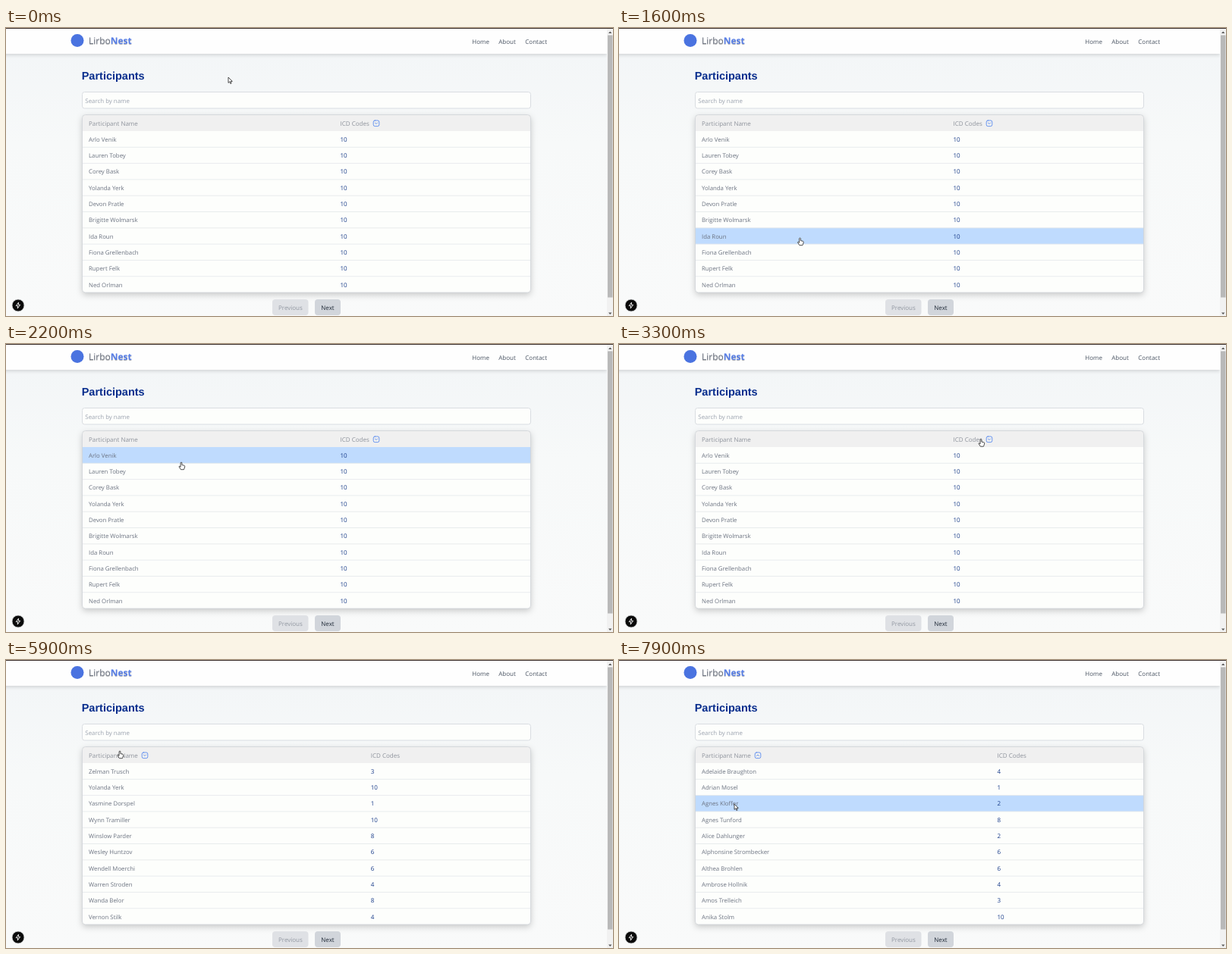
These frames come from a looping animation (800x380 px, 8 s). An HTML page:

```html
<!DOCTYPE html>
<html lang="en">
<head>
<meta charset="utf-8">
<title>Participants</title>
<style>
  html, body { margin: 0; width: 800px; height: 380px; overflow: hidden; background: #f7f9f9; }
  svg { display: block; }
  text { font: 500 8px "Open Sans", "Noto Sans", sans-serif; text-rendering: geometricPrecision; fill: #6b7280; }
  .bar { fill: #fefefe; filter: drop-shadow(0 2px 2px rgba(0, 0, 0, .13)); }
  .brand { font-size: 12px; font-weight: 400; filter: drop-shadow(.8px 1px .7px rgba(0, 0, 0, .28)); }
  .brand .strong { font-weight: 700; fill: #587fe8; }
  .nav text { fill: #4b5563; }
  .title { font: 700 14.5px "Liberation Sans", Arial, sans-serif; fill: #082d8d; }
  .hint { font-weight: 400; font-size: 7.9px; fill: #9ca3af; }
  .card { fill: #fdfefc; filter: drop-shadow(0 3px 4px rgba(0, 0, 0, .2)); }
  .head text { fill: #8d929b; }
  .name { font-size: 7.8px; font-weight: 400; }
  .code { font-size: 8px; fill: #173a88; }
  .hover { fill: #bfdbfe; }
  .line { stroke: #e4e7ea; stroke-width: .8; }
  .icon { fill: none; stroke: #5c8df0; stroke-width: .9; stroke-linecap: round; stroke-linejoin: round; }
  .cursor { fill: #fff; stroke: #222; stroke-width: .8; stroke-linejoin: round; }
</style>
</head>
<body>
<svg width="800" height="380" viewBox="0 0 800 380">
  <defs>
    <linearGradient id="sky" x2="0" y2="1">
      <stop stop-color="#f2f5f7"/><stop offset=".4" stop-color="#f7f9f9"/><stop offset="1" stop-color="#f9fafa"/>
    </linearGradient>
    <clipPath id="round"><rect x="100.5" y="114.5" width="591" height="234.5" rx="4"/></clipPath>
  </defs>

  <rect width="792" height="380" fill="url(#sky)"/>
  <rect class="bar" x="-6" width="798" height="34"/>
  <rect width="800" height="1" fill="#3b302c"/>

  <circle cx="94" cy="16.5" r="8.5" fill="#4a73e0"/>
  <text class="brand" x="109" y="21">Lirbo<tspan class="strong">Nest</tspan></text>
  <g class="nav">
    <text x="614.3" y="20.8">Home</text>
    <text x="649.3" y="20.8">About</text>
    <text x="684.3" y="20.8">Contact</text>
  </g>

  <text class="title" x="99.7" y="68.4">Participants</text>
  <rect x="100.5" y="84.5" width="591" height="21.5" rx="3" fill="#fdfefc" stroke="#d9dde2"/>
  <text class="hint" x="104.3" y="98.6">Search by name</text>

  <rect class="card" x="100.5" y="114.5" width="591" height="234.5" rx="4"/>
  <g clip-path="url(#round)">
    <rect x="100" y="114" width="592" height="22" fill="#f0f0f0"/>
    <rect class="hover" id="hover" x="100" width="592" height="21.3"/>
    <g id="lines"></g>
  </g>
  <rect x="100.5" y="114.5" width="591" height="234.5" rx="4" fill="none" stroke="#cfd2d7" stroke-width=".8"/>
  <g id="tables"></g>

  <rect x="351" y="358" width="47.5" height="21" rx="4" fill="#dfe1e5"/>
  <text x="359" y="371.6" style="fill:#9298a2">Previous</text>
  <rect x="407" y="358" width="34" height="21" rx="4" fill="#d1d5db"/>
  <text x="415.3" y="371.6" style="fill:#1f2937">Next</text>

  <circle cx="16" cy="366" r="8" fill="#0b0b0b" stroke="#d5d7d8" stroke-width=".8"/>
  <path d="M16.6 362l-3.4 4.6h2.4l-.4 3.4 3.5-4.7h-2.5z" fill="none" stroke="#fff" stroke-width=".9" stroke-linejoin="round"/>

  <rect x="792" y="1" width="8" height="379" fill="#f1f1f1"/>
  <rect x="793" y="9.5" width="6.5" height="346" fill="#b9b9b9"/>
  <path d="M794 7l2.2-2.6 2.2 2.6zM794 375.5h4.4l-2.2 2.6z" fill="#555"/>

  <path class="cursor" id="arrow" d="M0 0v7.4l1.7-1.6 1.2 2.7 1.2-.6-1.2-2.5h2.4z"/>
  <path class="cursor" id="hand" d="M-.9 .6q.9-1.2 1.8 0v3l3 .7q.9.3.8 1.3l-.6 2.4-.7 1.7h-4l-2.3-3.6q-.2-1 .8-.8l1.2 1z"/>
</svg>

<script>
const LOOP = 8000, STEP = 100, TOP = 136, ROW = 21.3;

// Each view: column x, sorted column, direction, rows
const views = [
  { x: 440.5, by: "code", up: false, rows: "Arlo Venik 10,Lauren Tobey 10,Corey Bask 10,Yolanda Yerk 10,Devon Pratle 10,Brigitte Wolmarsk 10,Ida Roun 10,Fiona Grellenbach 10,Rupert Felk 10,Ned Orlman 10" },
  { x: 440.5, by: "code", up: true, rows: "Adrian Mosel 1,Yasmine Dorspel 1,Colin Harvet 1,Greta Somlund 1,Petra Vonsel 1,Julian Breck 1,Oscar Tillmer 1,Nora Feldick 1,Simon Draker 1,Lydia Korben 1" },
  { x: 498.5, by: "name", up: true, rows: "Adelaide Braughton 4,Adrian Mosel 1,Agnes Kloffer 2,Agnes Tunford 8,Alice Dahlunger 2,Alphonsine Strombecker 6,Althea Brohlen 6,Ambrose Hollnik 4,Amos Trelleich 3,Anika Stolm 10" },
  { x: 480.7, by: "name", up: false, rows: "Zelman Trusch 3,Yolanda Yerk 10,Yasmine Dorspel 1,Wynn Tramiller 10,Winslow Parder 8,Wesley Huntzov 6,Wendell Moerchi 6,Warren Stroden 4,Wanda Belor 8,Vernon Stilk 4" }
];

// Time of each sort click and the view it opens
const clicks = [[0, 0], [3400, 1], [4100, 0], [5200, 2], [5700, 3], [6800, 2]];

// Pointer tip: time, x, y
const path = [
  [0, 293, 65], [300, 290, 72], [700, 262, 112], [1000, 224, 164], [1200, 218, 177],
  [1400, 229, 232], [1600, 238.5, 277], [1800, 238, 284], [2000, 235, 215], [2200, 231, 156],
  [2500, 250, 150], [2700, 310, 146], [3000, 450, 130], [3200, 477, 125.5], [4500, 477, 125.5],
  [4600, 450, 125], [5000, 165, 121], [5100, 150, 120], [7500, 150, 120], [7900, 152, 190], [8000, 152, 190]
];

const $ = id => document.getElementById(id);
const label = (cls, x, y, s) => `<text class="${cls}" x="${x}" y="${y}">${s}</text>`;

function tableMarkup({ x, by, up, rows }) {
  const iconX = by === "code" ? x + 47.5 : 183, d = up ? -1 : 1;
  const body = rows.split(",").map((row, i) => {
    const cut = row.lastIndexOf(" "), y = TOP + i * ROW + 13.8;
    return label("name", 109, y, row.slice(0, cut)) + label("code", x, y, row.slice(cut + 1));
  }).join("");
  return `<g><g class="head">${label("", 109, 129, "Participant Name")}${label("", x, 129, "ICD Codes")}</g>
    <rect class="icon" x="${iconX - 3.8}" y="122" width="7.6" height="7.6" rx="2"/>
    <path class="icon" d="M${iconX - 1.6} ${125.8 - d * .8}l1.6 ${d * 1.6} 1.6 ${-d * 1.6}"/>${body}</g>`;
}

$("tables").innerHTML = views.map(tableMarkup).join("");
$("lines").innerHTML = Array.from({ length: 9 }, (_, i) => {
  const y = TOP + (i + 1) * ROW;
  return `<path class="line" d="M100 ${y}H692"/>`;
}).join("");
const tables = [...$("tables").children];

function pointerAt(t) {
  const i = path.findIndex(p => p[0] > t);
  const [t0, x0, y0] = path[i - 1], [t1, x1, y1] = path[i];
  const k = (t - t0) / (t1 - t0);
  return [x0 + (x1 - x0) * k, y0 + (y1 - y0) * k];
}

const show = (el, on) => el.setAttribute("visibility", on ? "visible" : "hidden");

function draw(t) {
  const view = clicks.filter(c => c[0] <= t).pop()[1];
  tables.forEach((el, i) => show(el, i === view));

  const [x, y] = pointerAt(t);
  const row = Math.floor((y - TOP) / ROW);
  show($("hover"), row >= 0 && row < 10);
  $("hover").setAttribute("y", TOP + row * ROW);

  const hand = y > 115 && y < 349 && t < 7900;
  for (const id of ["hand", "arrow"]) {
    $(id).setAttribute("transform", `translate(${x} ${y})`);
    show($(id), (id === "hand") === hand);
  }
}

const start = performance.now();
function tick() {
  const t = (performance.now() - start) % LOOP;
  draw(Math.floor(t / STEP) * STEP);
  requestAnimationFrame(tick);
}
tick();
</script>
</body>
</html>
```
